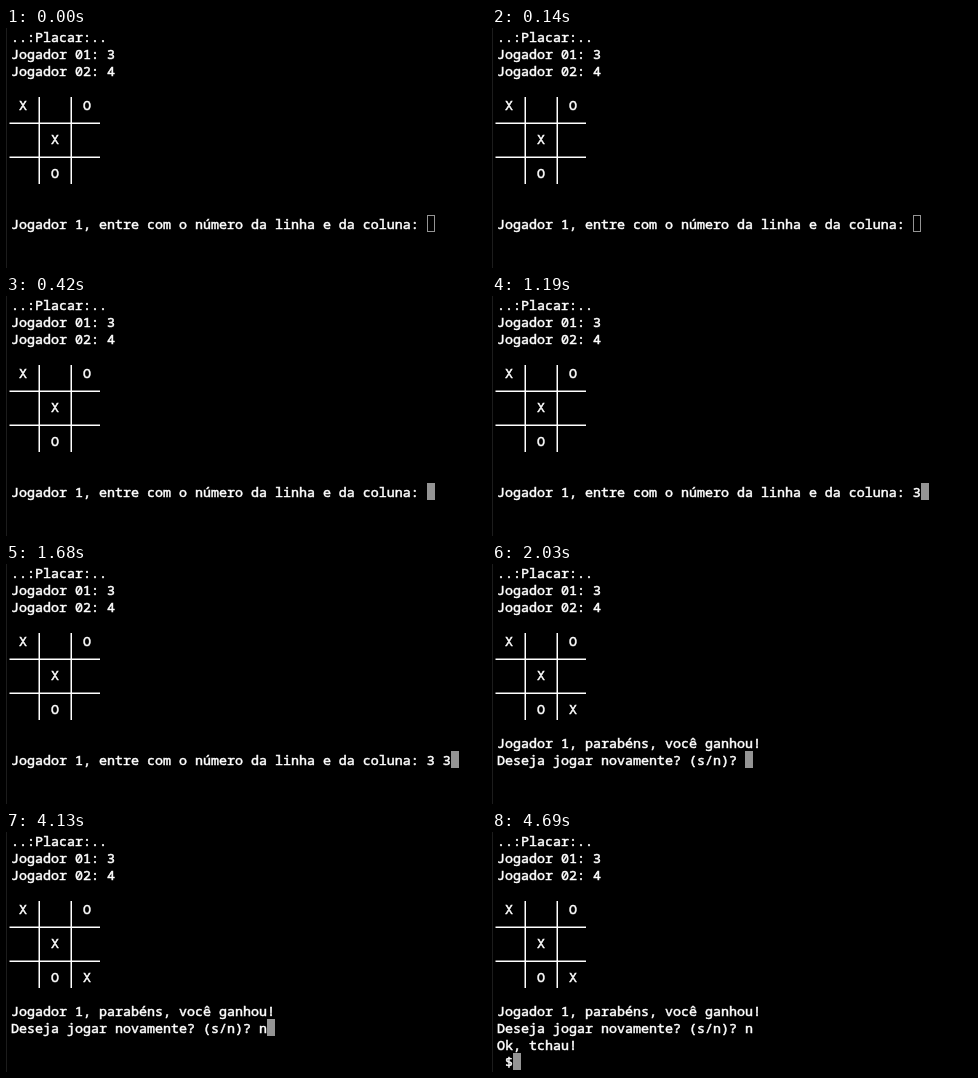
These frames come from a looping animation (480x240 px, 6090 ms). An HTML page:

```html
<!DOCTYPE html>
<html lang="pt">
<head>
<meta charset="utf-8">
<title>Jogo da velha</title>
<style>
  html, body { margin: 0; width: 100%; height: 100%; overflow: hidden; background: #000; }
  pre {
    position: absolute; left: 5px; top: 1px; margin: 0; color: #fff;
    font: 13.333px/17px "Noto Sans Mono", "DejaVu Sans Mono", monospace;
    font-variant-ligatures: none;
    -webkit-text-stroke: 0.5px #fff;
  }
  svg { position: absolute; left: 0; top: 0; }
  #cursor {
    position: absolute; box-sizing: border-box; width: 8px; height: 17px;
    border: 1px solid #949494;
  }
</style>
</head>
<body>
<svg width="480" height="240" fill="none">
  <path d="M.5 0V240" stroke="#1c1c1c"/>
  <path d="M3.5 95.25H94M3.5 129.25H94M33.25 69V156M65.25 69V156" stroke="#fff" stroke-width="1.5"/>
</svg>
<pre id="screen"></pre>
<div id="cursor"></div>
<script>
const LOOP = 6090, CELL = 8, ROW = 17, LEFT = 5;
const screen = document.getElementById("screen");
const cursor = document.getElementById("cursor");

const board = corner =>
  `..:Placar:..\nJogador 01: 3\nJogador 02: 4\n\n X       O\n\n     X\n\n     O   ${corner}\n\n`;
const ask = board(" ") + "\nJogador 1, entre com o número da linha e da coluna: ";
const won = board("X") + "Jogador 1, parabéns, você ganhou!\nDeseja jogar novamente? (s/n)? ";

// Start time in ms and everything printed before the cursor.
const states = [
  [0, ask],
  [1190, ask + "3"],
  [1400, ask + "3 "],
  [1680, ask + "3 3"],
  [2030, won],
  [4130, won + "n"],
  [4690, won + "n\nOk, tchau!\n $"],
];
const FOCUS = 420;

function draw(now) {
  const t = now % LOOP;
  const text = states.findLast(([start]) => t >= start)[1];
  const lines = text.split("\n");
  if (screen.textContent !== text) screen.textContent = text;
  cursor.style.left = LEFT + CELL * lines.at(-1).length + "px";
  cursor.style.top = ROW * (lines.length - 1) + "px";
  cursor.style.background = t < FOCUS ? "none" : "#949494";
}

function tick() {
  draw(performance.now());
  requestAnimationFrame(tick);
}
tick();
</script>
</body>
</html>
```
